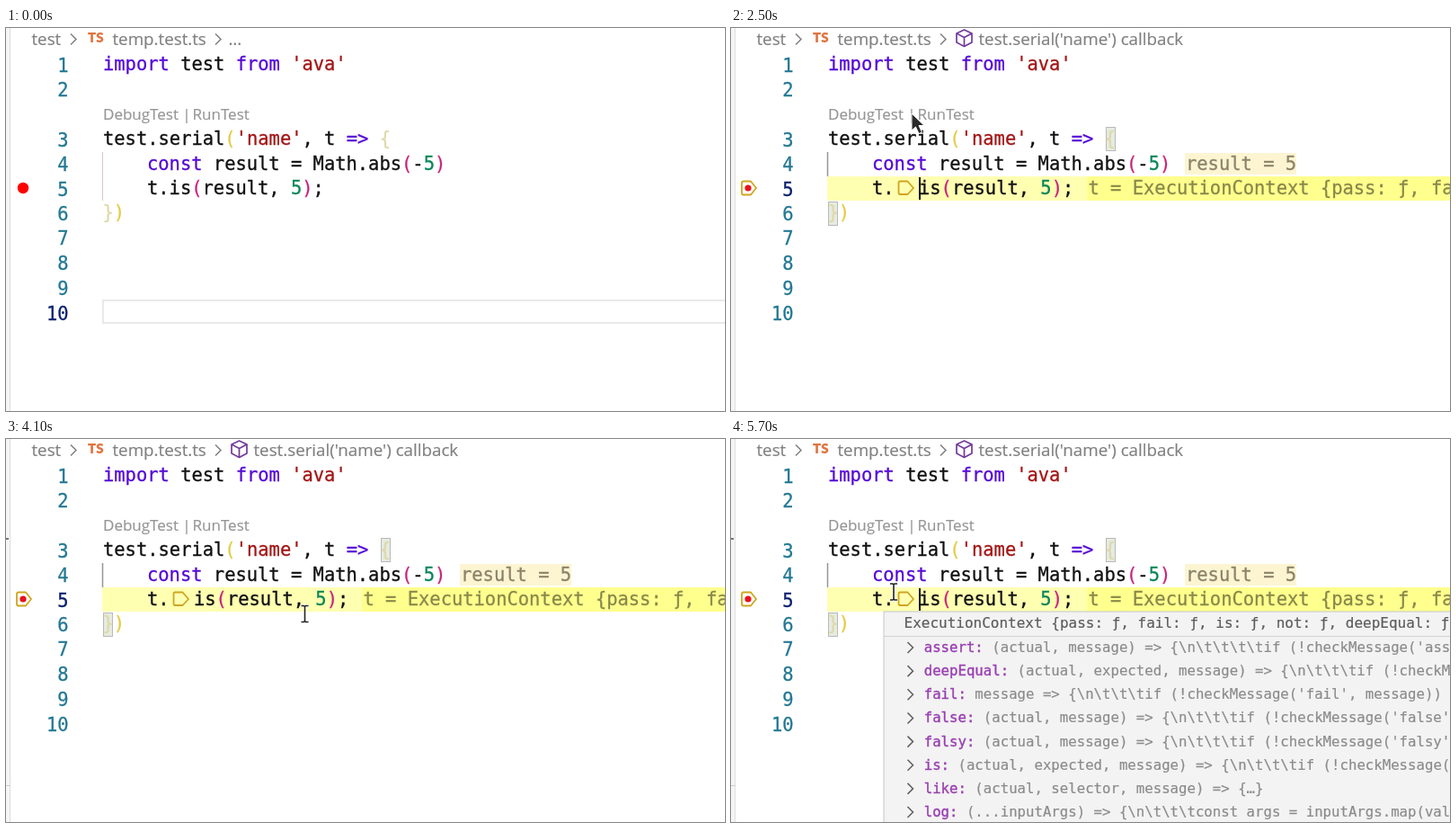
An HTML page that plays this animation: 800 by 426 pixels, repeating every 6200 ms.

```html
<!DOCTYPE html>
<html lang="en">
<head>
<meta charset="utf-8">
<title>Debugging a test</title>
<style>
  html, body { margin: 0; width: 100%; height: 100%; overflow: hidden; background: #fff; }
  svg { display: block; width: 800px; height: 426px; }
  text { white-space: pre; fill: currentColor; stroke: currentColor; stroke-width: .2; }
  tspan { fill: currentColor; stroke: currentColor; }
  .code { font: 20.46px "DejaVu Sans Mono", monospace; color: #111; stroke-width: .3; }
  .tree { font: 15.7px "DejaVu Sans Mono", monospace; color: #8b8b8b; }
  .head { font-size: 16px; color: #5c5c5c; }
  .crumb { font: 18.75px "Open Sans", sans-serif; color: #808080; }
  .lens { font: 17px "Open Sans", sans-serif; color: #969696; }
  .type { font: 900 15px Lato, sans-serif; color: #de7440; }
  .num { color: #237893; text-anchor: end; }
  .num.on { color: #0b216f; }
  .k { color: #5408d6; }
  .s { color: #a31515; }
  .n { color: #098658; }
  .y { color: #e3cb45; }
  .w { color: #dfd8a8; }
  .p { color: #c8247c; }
  .name { color: #9a3fb2; stroke-width: .4; }
  .line { fill: none; stroke: #808080; stroke-width: 1.5; }
  #tip .line { stroke: #606060; }
</style>
</head>
<body>
<svg id="stage" viewBox="0 0 800 426">
  <rect width="800" height="426" fill="#fff"/>
  <rect width="4" height="426" fill="#f5f5f5"/>
  <rect id="tint" y="112" width="4" height="274"/>
  <rect x="4" width="1" height="426" fill="#dedede"/>
  <g id="marks">
    <rect y="110" width="3" height="2" fill="#777"/>
    <rect y="385" width="5" height="1" fill="#ccc"/>
  </g>

  <g id="idle">
    <rect x="108" y="303" width="710" height="25" fill="none" stroke="#e9e9e9" stroke-width="2"/>
    <path d="M107.5 138V192" stroke="#d9c6cc"/>
    <circle cx="19" cy="178" r="6.2" fill="#f00"/>
    <text class="crumb" x="247.5" y="18.5">…</text>
  </g>

  <g id="debug">
    <rect x="107" y="165" width="289" height="27" fill="#ffffb2"/>
    <rect x="396" y="165" width="404" height="27" fill="#ffff8e"/>
    <rect x="505" y="139" width="124" height="24" fill="#fdf5d2"/>
    <path d="M107.5 138V165" stroke="#969696" stroke-width="1.5"/>
    <g fill="#e5ebe0" stroke="#b9b9b9">
      <rect x="417.5" y="110.5" width="10" height="26"/>
      <rect x="108.5" y="193.5" width="10" height="26"/>
    </g>
    <g fill="none" stroke="#cfa520" stroke-width="1.8" stroke-linejoin="round">
      <path d="M14 170.5H22L28 178L22 185.5H14Q12 185.5 12 183.5V172.5Q12 170.5 14 170.5Z"/>
      <path d="M188 170.5H196.5L203 178L196.5 185H188Q186.5 185 186.5 183V172.5Q186.5 170.5 188 170.5Z"/>
    </g>
    <circle cx="19" cy="178" r="3.6" fill="#e8101c"/>
    <g fill="none" stroke="#713a9c" stroke-width="1.7" stroke-linejoin="round">
      <path d="M259.5 2L268 6V16L259.5 20.5L251 16V6Z"/>
      <path d="M251 6L259.5 10.5L268 6M259.5 10.5V20.5"/>
    </g>
    <text class="crumb" x="275.5" y="18.5">test.serial('name') callback</text>
  </g>

  <text class="crumb" x="28.5" y="18.5">test</text>
  <path class="line" d="M72 6.5L78 12.5L72 18.5M233 6.5L239 12.5L233 18.5"/>
  <text class="type" x="91" y="16">TS</text>
  <text class="crumb" x="118.5" y="18.5">temp.test.ts</text>
  <text class="lens" id="lens" x="108" y="101.5">DebugTest</text>
  <text class="lens" x="196.2" y="101.5">|</text>
  <text class="lens" x="207.5" y="101.5">RunTest</text>
  <g id="code"></g>
  <rect id="caret" x="209" y="166" width="2" height="25" fill="#111"/>
  <g id="tip">
    <rect x="170" y="192" width="640" height="244" fill="#f3f3f3" stroke="#c4c8cc"/>
    <path d="M170 219.5H800" stroke="#d2d2d2"/>
  </g>

  <g id="hand" stroke="#222" stroke-width="1.5" stroke-linejoin="round" fill="#fff">
    <path d="M-2 1Q0 -2 2 1V8Q4 6 6 8.5Q8 7 9.5 9.5Q12 8.5 12 11.5V14Q12 17 10 20H0Q-2 16 -6.5 12Q-7 9 -4 10L-2 12Z"/>
    <path d="M2 8V11M6 8.5V11.5M9.5 9.5V12" fill="none"/>
  </g>
  <path id="arrow" d="M0 0V19L4.5 15L8 22.5L11.5 21L8 13.5H14Z" fill="#2b2b2b" stroke="#fff"/>
  <g id="beam" fill="none">
    <path d="M-4 -9H-1L0 -8L1 -9H4M0 -8V8M-4 9H-1L0 8L1 9H4" stroke="#fff" stroke-width="3.5"/>
    <path d="M-4 -9H-1L0 -8L1 -9H4M0 -8V8M-4 9H-1L0 8L1 9H4" stroke="#222" stroke-width="1.6"/>
  </g>
</svg>
<script>
const LOOP = 6200, STEP = 100;
const $ = id => document.getElementById(id);
const show = (el, on) => el.setAttribute('display', on ? 'inline' : 'none');

function make(tag, attrs, parent, text = '') {
  const el = document.createElementNS('http://www.w3.org/2000/svg', tag);
  for (const key in attrs) el.setAttribute(key, attrs[key]);
  el.textContent = text;
  parent.appendChild(el);
  return el;
}

// Parts are plain strings or [class, string] pairs.
function write(parent, cls, x, y, parts) {
  const line = make('text', { class: cls, x, y }, parent);
  for (const part of parts) {
    const [kind, str] = Array.isArray(part) ? part : ['', part];
    make('tspan', kind ? { class: kind } : {}, line, str);
  }
  return line;
}

const code = $('code');
const put = (x, y, ...parts) => write(code, 'code', x, y, parts);
const call = ['is', ['p', '('], 'result, ', ['n', '5'], ['p', ')'], ';'];

put(108, 47, ['k', 'import'], ' test ', ['k', 'from'], ' ', ['s', "'ava'"]);
put(108, 130, 'test.serial', ['y', '('], ['s', "'name'"], ', t ', ['k', '=>'], ' ', ['w', '{']);
put(157, 157.7, ['k', 'const'], ' result = Math.abs', ['p', '('], '-', ['n', '5'], ['p', ')']);
put(157, 184.8, 't.');
const plainCall = put(181.6, 184.8, ...call);
const pausedCall = put(209, 184.8, ...call);
put(107.5, 212, ['w', '}'], ['y', ')']);

const hints = [
  put(506, 157.7, 'result = 5'),
  put(397.5, 184.8, 't = ExecutionContext {pass: ƒ, fail: ƒ')
];
hints[0].style.color = '#8b826a';
hints[1].style.color = '#88884a';

const numbers = [49, 76, 131.5, 159, 186.5, 213.5, 241, 268.7, 296.5, 324.5]
  .map((y, i) => write(code, 'code num', 69.6, y, [String(i + 1)]));

const tip = $('tip'), open = '{\\n\\t\\t\\t';
const check = open + 'if (!checkMessage(';
write(tip, 'tree head', 192.5, 210,
  ['ExecutionContext {pass: ƒ, fail: ƒ, is: ƒ, not: ƒ, deepEqual: ƒ, ']);
[
  ['assert', '(actual, message) => ' + check.replace('if', '\\tif') + "'assert'"],
  ['deepEqual', '(actual, expected, message) => ' + check],
  ['fail', 'message => ' + check + "'fail', message))"],
  ['false', '(actual, message) => ' + check + "'false'"],
  ['falsy', '(actual, message) => ' + check + "'falsy'"],
  ['is', '(actual, expected, message) => ' + check + "'is'"],
  ['like', '(actual, selector, message) => {…}'],
  ['log', '(...inputArgs) => ' + open + 'const args = inputArgs.map(value']
].forEach(([name, value], i) => {
  const y = 237 + i * 26.15;
  make('path', { class: 'line', d: `M196.5 ${y - 11}l6 6l-6 6` }, tip);
  write(tip, 'tree', 214.7, y, [['name', name + ':'], ' ' + value]);
});

// Pointer path: time, x, y
const path = [
  [100, 738, 345], [400, 155, 99], [1300, 155, 99], [1600, 201, 95], [3000, 201, 95],
  [3600, 483, 217], [3700, 484, 219], [4500, 181, 170], [LOOP, 181, 170]
];

function pointer(t) {
  const i = Math.max(1, path.findIndex(key => key[0] > t));
  const a = path[i - 1], b = path[i];
  const u = Math.max(0, (t - a[0]) / (b[0] - a[0]));
  const e = u * u * (3 - 2 * u);
  return [a[1] + (b[1] - a[1]) * e, a[2] + (b[2] - a[2]) * e];
}

const within = (t, from, to) => t >= from && t < to;

function draw(time) {
  const t = Math.floor(time / STEP) * STEP;
  const paused = t >= 2400;
  const [x, y] = pointer(t);
  const kind = y > 112 ? 'beam' : x < 194 ? 'hand' : 'arrow';

  for (const el of [$('idle'), plainCall]) show(el, !paused);
  for (const el of [$('debug'), pausedCall, ...hints]) show(el, paused);
  show($('marks'), t >= 2600);
  show($('tip'), t >= 4700);
  show($('caret'), within(t, 2400, 2800) || within(t, 3300, 3900) || t >= 4700);
  $('tint').setAttribute('fill', within(t, 2600, 3100) ? '#f7eefb'
    : within(t, 3100, 3900) ? '#eef6f3' : '#f5f5f5');
  numbers.forEach((n, i) => n.classList.toggle('on', i === (paused ? 4 : 9)));

  for (const id of ['hand', 'arrow', 'beam']) {
    show($(id), t >= 100 && id === kind);
    $(id).setAttribute('transform', `translate(${x} ${y})`);
  }
  $('lens').style.color = t >= 100 && kind === 'hand' ? '#4c0ad0' : '';
}

const start = performance.now();
function tick() {
  draw((performance.now() - start) % LOOP);
  requestAnimationFrame(tick);
}
tick();
</script>
</body>
</html>
```
